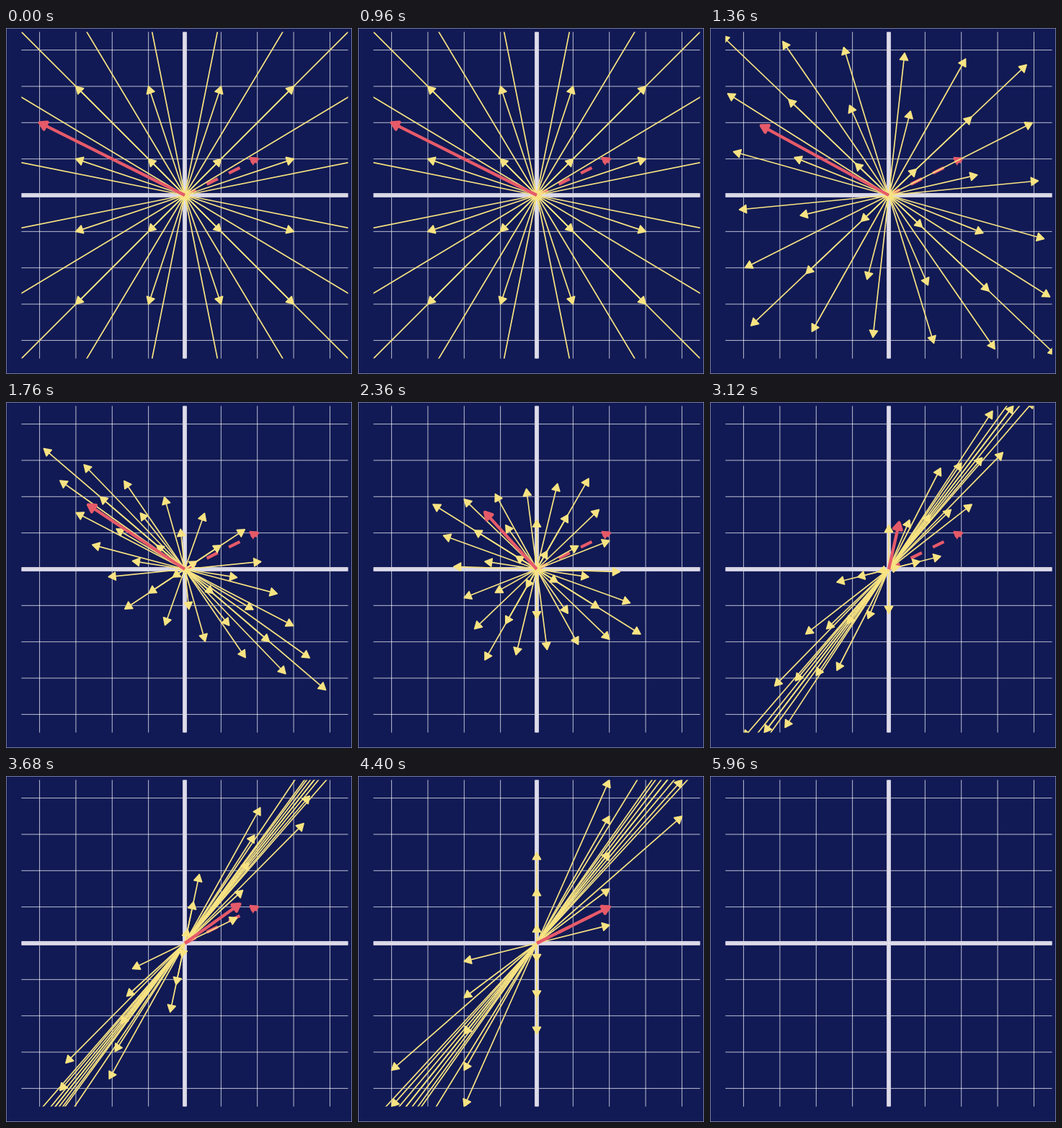
Animation, 480 px wide and 480 px high, one loop 6000 ms. Source, as an HTML page with a canvas:

```html
<!DOCTYPE html>
<html lang="en">
<head>
<meta charset="utf-8">
<title>Linear map</title>
<style>
html, body { margin: 0; width: 100%; height: 100%; overflow: hidden; background: #111a55; }
canvas { display: block; width: 480px; height: 480px; }
</style>
</head>
<body>
<canvas id="stage" width="480" height="480"></canvas>
<script>
const ctx = document.getElementById('stage').getContext('2d');
const LOOP = 6000, STEP = 40, FRAMES = LOOP / STEP;
const CX = 248, CY = 232, UNIT = 50.35, REACH = 4.5 * UNIT;
const NAVY = '#111a55', YELLOW = '#f8e382', RED = '#e65a69';
const STAGES = 14, THICK = 4.27, THIN = 1.7, HEAD = 11;
const ODD = [-5, -3, -1, 1, 3, 5];

const stageStart = k => Math.round(26.95 + 5.1 * k);
const ease = p => p < 0.5 ? 2 * p * p : 1 - 2 * (1 - p) * (1 - p);

// Share of the way from the identity to the final matrix; each stage rests one step, then moves.
function progress(frame) {
  if (frame < stageStart(0)) return 0;
  if (frame >= stageStart(STAGES)) return 1;
  let k = 0;
  while (frame >= stageStart(k + 1)) k++;
  const from = stageStart(k), span = stageStart(k + 1) - from - 1;
  const p = Math.max(0, frame - from - 1) / span;
  return (k + ease(p)) / STAGES;
}

// Blend of I and [[-1, -1], [-1, -1.5]]
const transform = (x, y, s) => [x * (1 - 2 * s) - y * s, -x * s + y * (1 - 2.5 * s)];

function line(x1, y1, x2, y2, width, color) {
  ctx.strokeStyle = color;
  ctx.lineWidth = width;
  ctx.beginPath();
  ctx.moveTo(x1, y1);
  ctx.lineTo(x2, y2);
  ctx.stroke();
}

function cross(offset, width, color) {
  line(CX - REACH, CY + offset, CX + REACH, CY + offset, width, color);
  line(CX + offset, CY - REACH, CX + offset, CY + REACH, width, color);
}

function arrow([x, y], width, color, dash = []) {
  const tx = CX + x * UNIT, ty = CY - y * UNIT;
  const angle = Math.atan2(CY - ty, CX - tx);
  const corner = turn => [tx + HEAD * Math.cos(angle + turn), ty + HEAD * Math.sin(angle + turn)];
  ctx.setLineDash(dash);
  line(CX, CY, tx, ty, width, color);
  ctx.fillStyle = color;
  ctx.beginPath();
  ctx.moveTo(...corner(Math.PI / 6));
  ctx.lineTo(tx, ty);
  ctx.lineTo(...corner(-Math.PI / 6));
  ctx.closePath();
  ctx.fill();
  ctx.stroke();
  ctx.setLineDash([]);
}

function drawGrid() {
  ctx.fillStyle = NAVY;
  ctx.fillRect(0, 0, 480, 480);
  ctx.strokeStyle = 'rgba(255,255,255,0.55)';
  ctx.lineWidth = 1;
  ctx.strokeRect(0.25, 0.25, 479.5, 479.5);
  for (let i = -4; i <= 4; i++) {
    if (i) cross(i * UNIT, 0.9, 'rgba(255,255,255,0.8)');
  }
  cross(0, 6, '#d2d0e1');
  cross(0, 1.2, '#efedf5');
}

function draw(time) {
  const frame = Math.floor((time % LOOP) / STEP);
  drawGrid();
  if (frame === FRAMES - 1) return;
  const s = progress(frame);
  ctx.save();
  ctx.beginPath();
  ctx.rect(CX - REACH, CY - REACH, 2 * REACH, 2 * REACH);
  ctx.clip();
  ctx.lineJoin = 'round';
  arrow([2, 1], THICK, RED, [4 * THICK, 4 * THICK]);
  for (const x of ODD) {
    for (const y of ODD) arrow(transform(x, y, s), THIN, YELLOW);
  }
  arrow(transform(-4, 2, s), THICK, RED);
  ctx.restore();
}

const began = performance.now();
function tick() {
  draw(performance.now() - began);
  requestAnimationFrame(tick);
}
tick();
</script>
</body>
</html>
```
